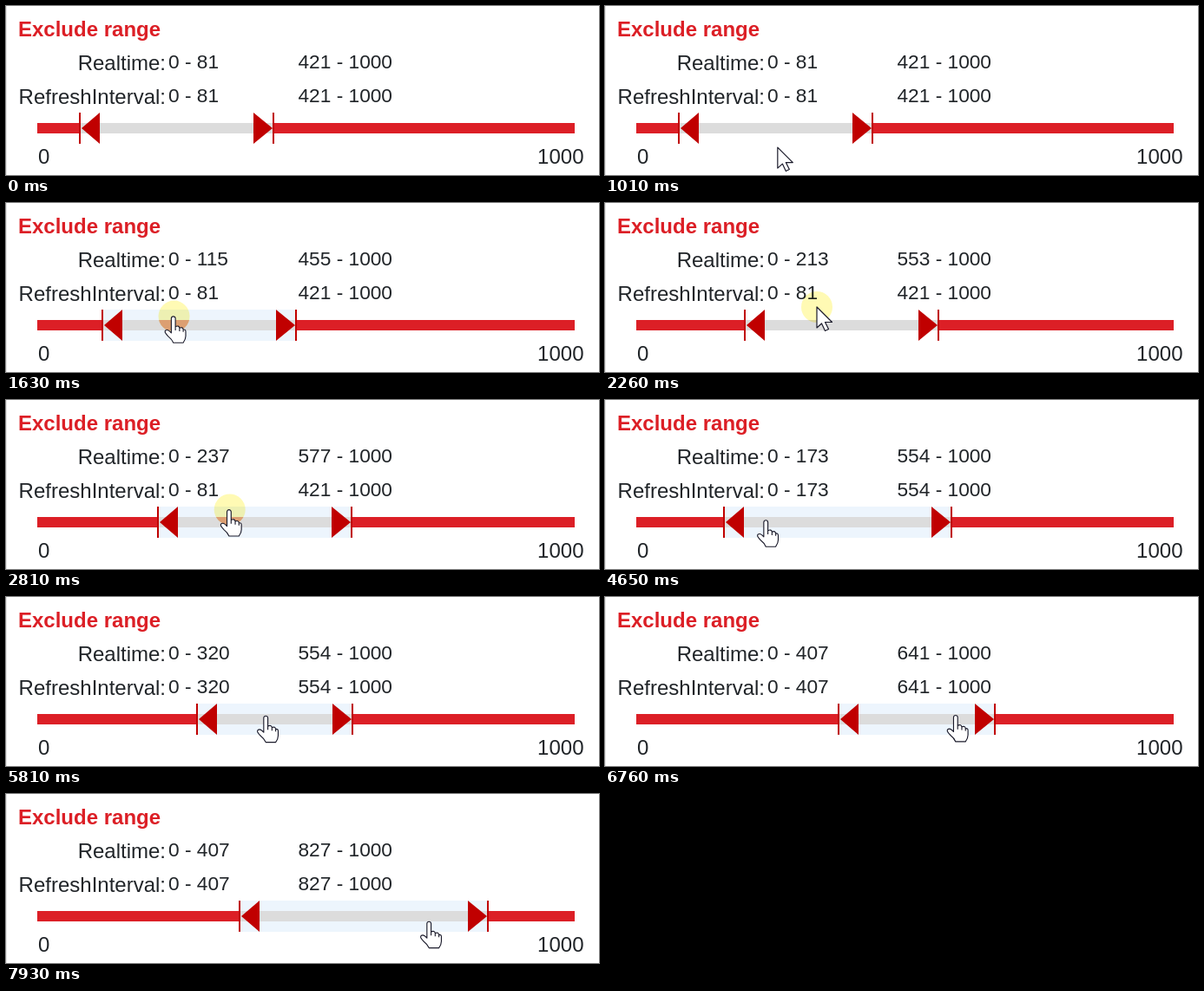
An HTML page for the animation above (8 s loop, 683 by 195 pixels).

```html
<!DOCTYPE html>
<html>
<head>
<meta charset="utf-8">
<style>
  html, body { margin: 0; width: 100%; height: 100%; overflow: hidden; background: #fff; }
  svg { display: block; width: 683px; height: 195px; font-family: "Liberation Sans", Arial, sans-serif; font-size: 24px; }
  text { fill: #212529; }
  .label { text-anchor: end; }
  .value { font-size: 22.7px; }
  .red { fill: #dc1f26; }
  .handle { fill: #c00000; }
</style>
</head>
<body>
<svg viewBox="0 0 683 195">
  <rect width="1" height="195" fill="#e4e4e4"/>
  <text class="red" x="14" y="35" font-weight="bold">Exclude range</text>
  <text class="label" x="184" y="74">Realtime:</text>
  <text class="label" x="184" y="113">RefreshInterval:</text>
  <text class="value" x="187" y="72" id="liveLow"></text>
  <text class="value" x="336.5" y="72" id="liveHigh"></text>
  <text class="value" x="187" y="111" id="slowLow"></text>
  <text class="value" x="336.5" y="111" id="slowHigh"></text>
  <text x="37" y="182">0</text>
  <text class="label" x="665.5" y="182">1000</text>

  <rect id="hover" y="123" height="36" fill="#edf5fd"/>
  <rect x="36" y="135" width="619" height="12" fill="#dcdcdc"/>
  <rect class="red" id="barLeft" x="36" y="135" height="12"/>
  <rect class="red" id="barRight" y="135" height="12"/>
  <path class="handle" id="left" d="M-1-18h2v36h-2zM2 0L23-18V18z"/>
  <path class="handle" id="right" d="M-1-18h2v36h-2zM-1 0L-23-18V18z"/>

  <clipPath id="disc"><circle r="18"/></clipPath>
  <g id="press" style="mix-blend-mode:multiply">
    <circle r="18" fill="#fffab4"/>
    <rect id="glow" x="-18" width="36" height="12" fill="#ffb884" clip-path="url(#disc)"/>
  </g>
  <g id="cursor" fill="#fff" stroke="#1a1a2a" stroke-width="1.2" stroke-linejoin="round">
    <path id="arrow" d="M0 0V24l5.5-5 4 8.500 4-2-4-8h8z"/>
    <path id="hand" transform="translate(-.8 .2) scale(.95)" d="M-2.500 2.500a2.500 2.500 0 0 1 5 0v10q4-2 5 1.500 4-1.500 4.500 2 3-.5 3 2.500v5.500q0 4-3 8h-12q-2-4.500-6-7.500-3-3-4-5-.5-3 2.500-3 2 0 5 3.500zM2.500 12v5M7.500 14v4M12 16v3"/>
  </g>
</svg>
<script>
const $ = id => document.getElementById(id);
const LOOP = 8000, LAG = 70;

// Pointer moves: start, end, x, y, ease-out power; it rests in between
const moves = [
  [250, 260, 327, 191], [260, 330, 309, 191], [380, 390, 275, 230],
  [560, 1360, 168, 136, 1.5], [1360, 2225, 244, 120, 1.09], [2400, 2850, 259, 127],
  [3080, 3840, 136, 138, 2.2], [4440, 4790, 219, 139], [5460, 5810, 300, 137],
  [6070, 6560, 349, 133], [6695, 6835, 467, 140], [7100, 7300, 583, 147],
  [7300, 7560, 553, 147], [7860, 7930, 488, 147]
];
const presses = [[1360, 2850], [3970, 4170], [4990, 5190], [6070, 6560], [7560, 7730]];

function pointer(t) {
  let x = 327, y = 230;
  for (const [start, end, toX, toY, power = 1] of moves) {
    if (t < start) break;
    const k = 1 - (1 - Math.min(1, (t - start) / (end - start))) ** power;
    x += (toX - x) * k;
    y += (toY - y) * k;
  }
  return { x, y };
}

// Share of a drag done, following the pointer from x = from to x = to
const dragged = (t, start, end, from, to) =>
  t < start ? 0 : t >= end ? 1 : (pointer(t).x - from) / (to - from);

// Handle positions and the values they stand for
function slider(t) {
  if (t < 4170) {
    const k = dragged(t, 1360, 2850, 168, 259);
    return { left: 85 + 91 * k, right: 308 + 91 * k, low: 81 + 163 * k, high: 421 + 163 * k };
  }
  if (t < 5190) return { left: 137, right: 399, low: 173, high: 554 };
  const k = dragged(t, 6070, 6560, 300, 349), clicked = t >= 7730;
  return {
    left: 220 + 49 * k, right: clicked ? 555 : 399 + 50 * k,
    low: 320 + 87 * k, high: clicked ? 827 : 554 + 87 * k
  };
}

function set(id, attrs) {
  for (const name in attrs) $(id).setAttribute(name, attrs[name]);
}
const show = (id, on) => set(id, { visibility: on ? "visible" : "hidden" });
const move = (id, x, y) => set(id, { transform: `translate(${x} ${y})` });

function print(name, { low, high }) {
  $(name + "Low").textContent = `0 - ${Math.round(low)}`;
  $(name + "High").textContent = `${Math.round(high)} - 1000`;
}

function draw(t) {
  const { x, y } = pointer(t), s = slider(t), late = t - LAG;
  const left = Math.round(s.left), right = Math.round(s.right);
  const released = presses.map(p => p[1]).filter(end => end <= late).pop() || 0;
  print("live", slider(late));
  print("slow", slider(released));

  move("left", left, 141);
  move("right", right, 141);
  set("barLeft", { width: left - 36 });
  set("barRight", { x: right, width: 655 - right });
  set("hover", { x: left, width: right - left });

  const onBar = y >= 123 && y <= 159;
  const inside = onBar && x > left && x < right;
  const down = presses.some(([a, b]) => t >= a && t < b);
  show("hover", inside);
  show("press", down);
  show("glow", down && inside);
  set("glow", { y: 135 - y });
  move("press", x, y);
  move("cursor", x, y);
  show("hand", onBar);
  show("arrow", !onBar);
}

function frame() {
  draw(performance.now() % LOOP);
  requestAnimationFrame(frame);
}
frame();
</script>
</body>
</html>
```
